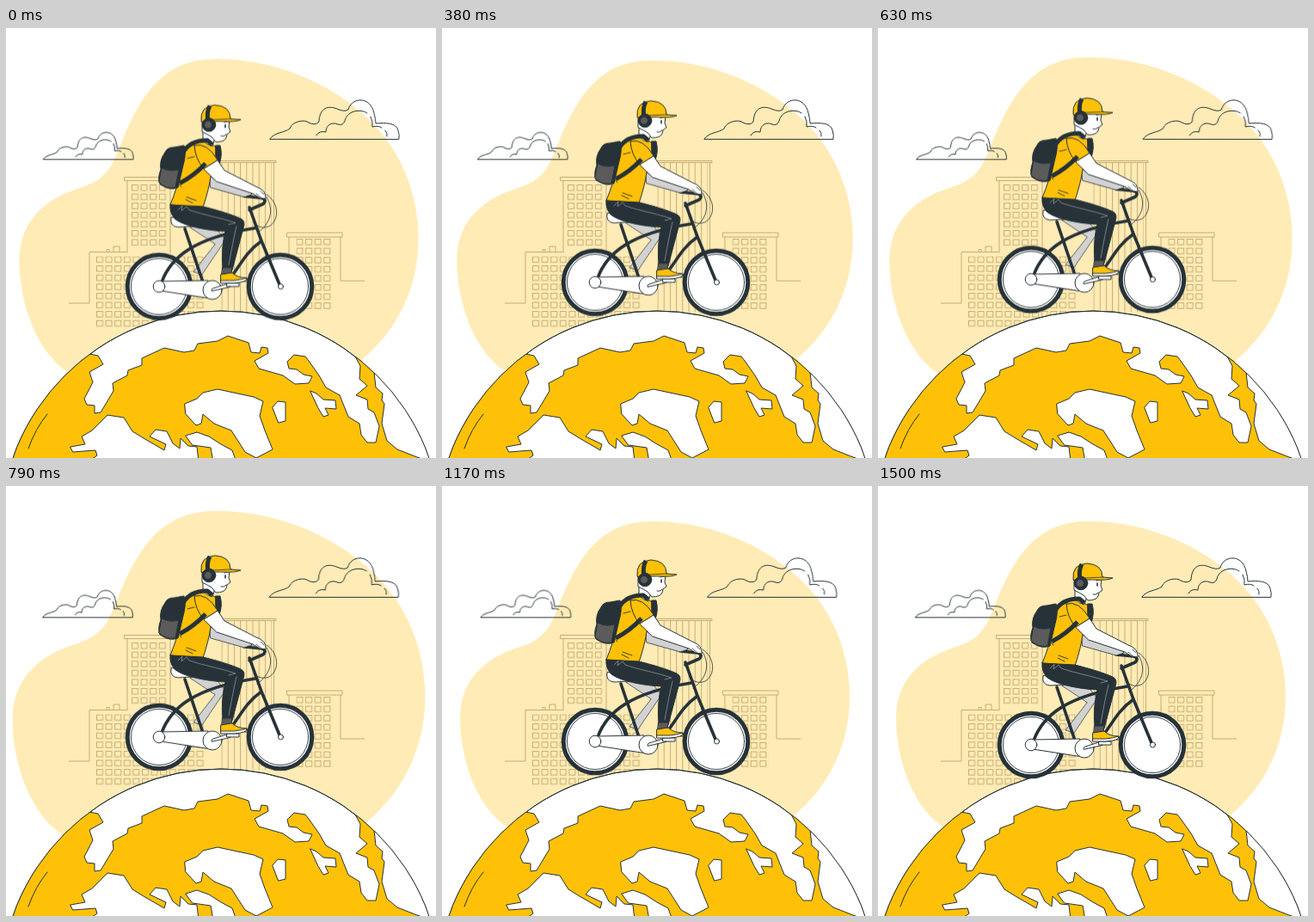
Write an HTML page without scripts that moves like this. It is 500 by 500 pixels and loops after 1.54 s.

```html
<!DOCTYPE html>
<html lang="en">
<head>
<meta charset="utf-8">
<title>Cyclist on a globe</title>
<style>
  html, body { margin: 0; height: 100%; overflow: hidden; background: #fff; }
  svg { display: block; width: 100vw; height: 100vh; }

  .ink { fill: none; stroke: #263238; stroke-linecap: round; stroke-linejoin: round; }
  .white { fill: #fff; }
  .yellow { fill: #ffc107; }
  .dark { fill: #263238; }
  .grey { fill: #d2d2d2; }
  .slate { fill: #5b5b5b; }
  .tube { fill: none; stroke-width: 3.6; }
  .city { fill: none; stroke: #c6ad74; stroke-width: 1; }
  .cloud { vector-effect: non-scaling-stroke; }

  .blob, .clouds, .rider { animation: 1540ms linear infinite; }
  .blob { fill: #ffebb5; transform-origin: 247.5px 245px; animation-name: heartbeat; }
  .clouds { animation-name: shake; }
  .rider { animation-name: float; }

  @keyframes heartbeat {
    0% { transform: scale(1.0133); }
    8.44%, 47.4% { transform: scale(1.1); }
    27.92%, 37.66%, 57.14%, 100% { transform: scale(1); }
  }
  @keyframes shake {
    0% { transform: translateX(-.13px); }
    8.44%, 86.36% { transform: translateX(-1px); }
    18.18%, 76.62% { transform: translateX(2px); }
    27.92%, 47.4%, 66.88% { transform: translateX(-4px); }
    37.66%, 57.14% { transform: translateX(4px); }
    96.1%, 100% { transform: none; }
  }
  @keyframes float {
    0% { transform: translateY(-.27px); }
    47.4% { transform: translateY(-10px); }
    96.1%, 100% { transform: none; }
  }
</style>
</head>
<body>
<svg viewBox="0 0 500 500">
  <defs>
    <pattern id="windows" width="10.6" height="10.6" patternUnits="userSpaceOnUse">
      <rect class="city" x=".5" y=".5" width="7" height="6.4"/>
    </pattern>
    <pattern id="bars" width="7.2" height="10" patternUnits="userSpaceOnUse">
      <path class="city" d="M.5 0V10"/>
    </pattern>
    <clipPath id="disc"><circle cx="250" cy="586" r="257"/></clipPath>
    <g id="cloud" class="ink">
      <path class="cloud" d="M307 129C312 121 324 122 330 117C333 108 348 106 352 110Q360 114 364 109C365 92 375 90 385 94Q394 98 398 95C402 80 424 79 428 99Q430 106 430 111C441 110 454 110 456 119Q458 125 457 129Z"/>
      <path class="cloud" d="M361 125Q364 119 372 121C372 112 380 109 386 112Q392 114 394 108C397 95 414 94 420 99M424 103Q427 109 426 115Q433 113 437 116M441 119Q444 122 443 126"/>
    </g>
    <g id="wheel" class="ink">
      <circle class="white" r="36.8" stroke-width="5"/>
      <circle r="32.6" stroke-width=".9"/>
    </g>
  </defs>

  <path class="blob" d="M245 41C330 41 400 85 432 125C462 162 474 205 474 245C474 300 450 350 408 384C350 425 130 430 72 394C38 368 21 315 21 270C21 225 50 201 85 189C112 180 121 173 131 150C143 122 150 100 171 74C190 52 212 41 245 41Z"/>

  <g class="city">
    <path d="M73 320H97V260.500H141M125 260V254H132V260M117 260V257.500H120V260M141 261V177.500H137.500V173.500H194V177.500H141M191 178V262"/>
    <path d="M249 156.500V154.500H314V156.500ZM311.500 157V330"/>
    <path d="M329 330V243H326.500V238H391V243H329M389 243V294H417"/>
    <g stroke="none" fill="url(#windows)">
      <rect width="42" height="74" transform="translate(146 182)"/>
      <rect width="127" height="84" transform="translate(105 265.500)"/>
      <rect width="42" height="84" transform="translate(337.500 245)"/>
    </g>
    <rect width="58" height="173" transform="translate(250.500 157)" stroke="none" fill="url(#bars)"/>
  </g>

  <g class="clouds">
    <use href="#cloud"/>
    <use href="#cloud" transform="translate(-170.500 63.500) scale(.697 .69)"/>
  </g>

  <g class="ink">
    <circle class="white" cx="250" cy="586" r="257"/>
    <g clip-path="url(#disc)">
      <path class="yellow" d="M97 379L107 381 113 391 97 400 101 412 91 431 94 438 103 439 103 448 110 447 125 422 124 413 141 404 142 398 158 392 158 384 184 372 207 377 219 375 223 367 246 364 258 358 282 366 285 377 295 378 297 371 304 372 305 378 289 387 294 396 322 404 336 414 352 413 356 405 346 403 338 397 329 396 327 388 335 380 348 382 352 387 364 404 372 418 388 427 398 452 411 460 413 473 420 482 430 482 434 463 428 447 421 443 420 432 407 427 420 416 411 408 412 393 406 382 510 382 510 510 0 510 0 379Z"/>
      <g class="white">
        <path d="M428 400L430 418 438 425 437 433 440 437 437 460 443 480 455 490 478 499 510 510 510 400Z"/>
        <path d="M208 437L222 431 229 424 246 420 288 429 299 434 295 451 301 468 310 490 291 500 278 493 262 468 242 460 229 449 227 460 221 462 209 449Z"/>
        <path d="M310 441L316 434 325 435 325 457 317 459Z"/>
        <path d="M354 422L361 425 369 432 383 433 384 443 371 442 375 450 369 452 363 442Z"/>
        <path d="M75 487L92 484 88 475 100 468 118 450 137 453 147 469 160 477 184 491 186 484 167 475 174 467 187 469 194 483 202 489 203 477 212 486 222 487 224 505H95L106 497 104 491 78 493Z"/>
        <path d="M209 474L222 470 236 475 250 484 263 491 268 505H241L238 488 217 485Z"/>
      </g>
      <path d="M26 489Q34 466 48 449"/>
    </g>
    <circle cx="250" cy="586" r="257"/>
  </g>

  <g class="rider ink">
    <path class="grey" stroke-width=".7" d="M214 232L240 228 255 247 228 287 218 284 243 252Z"/>
    <use href="#wheel" x="178" y="301"/>
    <use href="#wheel" x="319" y="301"/>

    <!-- bicycle -->
    <path class="white" d="M192 221Q190 231 200 232L216 231 219 222Z"/>
    <g class="tube">
      <path d="M208 234L229 296"/>
      <path d="M181 296C192 266 220 244 290 233"/>
      <path d="M296 249C277 262 270 282 258 294"/>
      <path d="M283 209L297 248 319 301"/>
      <path d="M277 196L297 198Q304 200 299 205L283 212"/>
    </g>
    <path class="white" d="M180 295L235 294 238 315 180 306Z"/>
    <circle class="white" cx="178" cy="301" r="6.800"/>
    <circle class="white" cx="240" cy="305" r="11"/>
    <circle class="white" cx="319.500" cy="301" r="3"/>
    <path class="white" d="M239 306Q238 304 241 303L260 297 261 301Z"/>
    <path class="white" d="M257 297H271V301H257Z"/>
    <path stroke-width=".8" d="M303 194C318 204 318 224 306 231Q297 235 289 228M303 197C312 212 308 228 292 239"/>

    <!-- far arm -->
    <path class="grey" stroke-width=".8" d="M237 173L270 184 282 188 286 194 277 197 238 186Z"/>

    <!-- body -->
    <path class="yellow" d="M208 141Q219 133 233 131L244 139Q249 150 248 157L238 173Q236 188 229 209L191 206Q199 187 206 158Z"/>
    <path class="dark" d="M244 137L249 137Q252 148 248 159L244 154Z"/>
    <path class="white" d="M229 119L229 131Q234 137 240 138L243 128Z"/>
    <path class="white" d="M230 164L246 154 254 166 291 185Q303 189 302 199L295 198 287 193 245 179Z"/>
    <path stroke-width=".8" d="M291 193L298 199M296 190L300 194"/>
    <path class="yellow" d="M219 137Q234 133 246 154L230 164Q220 153 219 137Z"/>
    <path stroke-width="5" stroke-linecap="butt" d="M206 145Q214 131 234 131L240 136M232 158Q219 172 202 181"/>
    <path stroke-width=".9" d="M210 197L221 201M209 200L217 204M201 182L204 185M211 152L219 150"/>

    <!-- backpack -->
    <path class="dark" d="M185 145Q187 139 196 139L207 137Q210 147 206 160L200 186Q190 190 179 182Q176 174 180 165Q178 154 185 145Z"/>
    <path class="slate" d="M181 163Q190 168 201 165L197 186Q186 188 178 180Z"/>

    <!-- leg -->
    <path class="dark" d="M191 206L229 208C245 212 262 217 273 222Q279 225 276 233L263 282 252 281Q250 256 255 237C235 236 206 231 196 222Q190 215 191 206Z"/>
    <path stroke="#8d9498" stroke-width=".8" d="M200 212L205 207 204 213 210 208 213 212C230 218 250 221 267 227L259 229M268 231Q264 248 259 276"/>
    <path class="slate" d="M252 279L263 279 262 287 251 287Z"/>
    <path class="yellow" d="M250 287L263 285Q269 291 280 291L281 295 250 295Z"/>
    <path class="white" d="M250 294L265 294Q274 293 280 291Q281 296 265 297H250Z"/>

    <!-- head -->
    <path class="white" d="M228 108V121Q236 125 239 127L244 133Q254 133 256 128L257 124 261 121 259 116 260 107Z"/>
    <path d="M250 126Q254 127 256 124M254 110L258 109"/>
    <path stroke-width="1.600" d="M255 113V116"/>
    <path class="yellow" d="M227 109Q225 91 243 90Q261 91 261 106L273 107Q268 110 250 109Z"/>
    <path stroke-width=".8" d="M241 107L262 106"/>
    <path stroke-width="5" stroke-linecap="butt" d="M237 91Q233 98 235 110"/>
    <circle class="dark" cx="236" cy="113" r="7.800"/>
    <circle class="slate" cx="235" cy="113" r="4.500"/>
  </g>
</svg>
</body>
</html>
```
